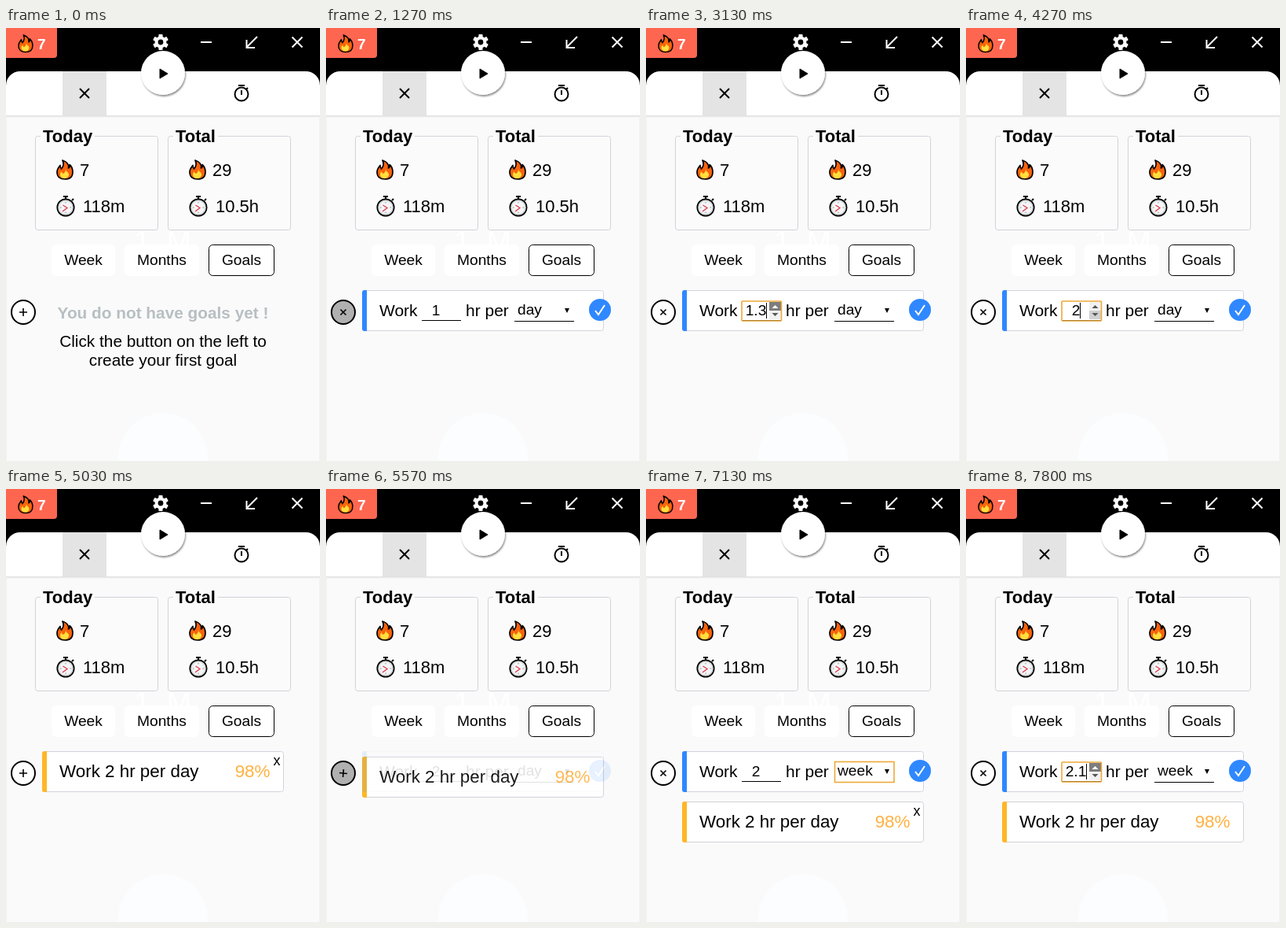
Write an HTML page that moves like this. It is 400 by 550 pixels and loops after 8 s.

```html
<!DOCTYPE html>
<html lang="en">
<head>
<meta charset="utf-8">
<title>Goals</title>
<style>
  html, body { margin: 0; width: 100%; height: 100%; overflow: hidden; background: #fafafa; }
  svg { display: block; width: 400px; height: 550px; font-family: "Liberation Sans", Arial, sans-serif; }
  .bold { font-weight: bold; }
  .t19 { font-size: 19.2px; }
  .t21 { font-size: 20.8px; }
  .t22 { font-size: 22px; }
  .mid { text-anchor: middle; }
  .line { fill: none; stroke: #000; stroke-width: 2; }
  .white { stroke: #fff; }
  .card { fill: #fbfbfb; stroke: #d2d2da; }
  .ring { fill: none; stroke: #eda93a; stroke-width: 1.6; }
</style>
</head>
<body>
<svg viewBox="0 0 400 550">
  <defs>
    <filter id="shadow" x="-30%" y="-30%" width="160%" height="160%">
      <feDropShadow dx="1" dy="2" stdDeviation="1.2" flood-opacity=".45"/>
    </filter>
    <linearGradient id="under" x2="0" y2="1">
      <stop stop-color="#dcdcdc"/><stop offset="1" stop-color="#fafafa"/>
    </linearGradient>
    <g id="flame">
      <path d="M8 1C14 3 16.500 7 15.500 11C17 10 17.500 8 17 6.500C20 9 21 12 21 16C21 22 17 25 11 25C5 25 1 22 1 16C1 12 3 10 5 7.500C5 10 5.500 11 6.500 12C9 9 10 5 8 1Z"
        fill="#f7630c" stroke="#000" stroke-width="1.7" stroke-linejoin="round"/>
      <path d="M12 12C12 16 17 16 16 20C15 23 13 24 11 24C7 24 5 22 5 19C5 17 6 16 7 15C7 17 8 18 9 18C11 17 12 15 12 12Z" fill="#ffdf3d"/>
    </g>
    <g id="watch">
      <path d="M0-11V-14M-3-14H3M8-9L10-11" class="line"/>
      <circle r="10.700" fill="#d5d8da" stroke="#000" stroke-width="1.700"/>
      <circle r="8" fill="#f5f6f7"/>
      <path d="M-3.500-3L2 .5L-4 5" fill="none" stroke="#e5374b" stroke-width="1.300"/>
      <path d="M0-7V-5.500M0 5.500V7M-7 0H-5.500M5.500 0H7" stroke="#888"/>
    </g>
  </defs>

  <rect width="400" height="550" fill="#fafafa"/>
  <rect width="400" height="90"/>
  <path d="M0 111V73A18 18 0 0 1 18 55H382A18 18 0 0 1 400 73V111Z" fill="#fff"/>
  <rect y="111" width="400" height="3" fill="url(#under)"/>
  <path d="M.5 112V550M399.500 112V550" stroke="#f1f1f1"/>

  <path d="M0 0H65V34A4 4 0 0 1 61 38H0Z" fill="#ff6650"/>
  <use href="#flame" transform="translate(15 8) scale(.9)"/>
  <text x="40" y="27" font-size="19.200" class="bold" fill="#fff">7</text>
  <g id="gear" transform="translate(197 18)" fill="#fff"></g>
  <path d="M248 18H262M320 11L307 24M306.500 15V25H317M364.500 11.500L377.500 24.500M377.500 11.500L364.500 24.500" class="line white"/>

  <rect x="72" y="55" width="56" height="56" fill="#e4e4e4"/>
  <path d="M94 77L106 89M106 77L94 89" class="line"/>
  <circle cx="300" cy="84" r="8.500" class="line"/>
  <path d="M296 73H304M300 79V85M306 78L308 76" class="line"/>
  <circle cx="200" cy="57" r="28" fill="#fff" filter="url(#shadow)"/>
  <path d="M196 52V64L206 58Z" stroke="#000" stroke-linejoin="round"/>

  <circle cx="200" cy="546" r="57" fill="#fbfdff"/>
  <text y="284" font-size="37" fill="#fff"><tspan x="163">1</tspan><tspan x="205">M</tspan></text>

  <g id="cards"></g>
  <g id="tabs" class="t19 mid"></g>

  <g id="empty">
    <text x="200" y="369" class="t21 bold mid" fill="#b7bfc2">You do not have goals yet !</text>
    <text x="200" y="405" class="t21 mid">Click the button on the left to</text>
    <text x="200" y="429" class="t21 mid">create your first goal</text>
  </g>

  <g id="item">
    <rect x="46.500" y="333.500" width="307" height="51" rx="3" fill="#fff" stroke="#d2d2da"/>
    <path d="M52 333H49A3 3 0 0 0 46 336V382A3 3 0 0 0 49 385H52Z" fill="#ffb727"/>
    <text x="68" y="366" font-size="22.400">Work 2 hr per day</text>
    <text x="336.500" y="366" font-size="22.400" text-anchor="end" fill="#ffb242">98%</text>
    <text id="close" x="340.500" y="351" font-size="18">x</text>
  </g>

  <g id="form">
    <rect x="46.500" y="333.500" width="307" height="51" rx="3" fill="#fff" stroke="#d2d2da"/>
    <path d="M52 333H49A3 3 0 0 0 46 336V382A3 3 0 0 0 49 385H52Z" fill="#2f88ff"/>
    <text x="68" y="366" font-size="21">Work</text>
    <text x="178" y="366" font-size="21">hr per</text>
    <path d="M122 371.500H172M240 372.500H316" stroke="#000"/>
    <text id="value" x="140" y="365" class="t19 mid"></text>
    <g id="spinner">
      <rect id="up" x="157" y="348" width="15" height="11"/>
      <rect id="down" x="157" y="359" width="15" height="11"/>
      <path id="upArrow" d="M160.500 356H168.500L164.500 352Z"/>
      <path d="M160.500 362H168.500L164.500 366Z" fill="#555"/>
    </g>
    <path id="caret" d="M0 349V369" stroke="#000"/>
    <rect id="inputRing" x="122" y="347" width="50.500" height="25" rx="1" class="ring"/>
    <text id="unit" x="244" y="364" class="t19"></text>
    <path d="M304 356H310L307 362Z"/>
    <rect id="unitRing" x="240.500" y="346.500" width="75.500" height="26" class="ring"/>
    <circle id="check" cx="349" cy="358" r="14" fill="#2f88ff"/>
    <path d="M343 359L347 364L355 352" class="line white" stroke-width="1.500"/>
  </g>

  <g id="list">
    <rect id="listBox" x="240" y="373" width="76" height="98"/>
    <g id="options" class="t19"></g>
  </g>

  <circle id="add" cx="22" cy="361" r="15" stroke="#000" stroke-width="2"/>
  <path id="plus" d="M17 361H27M22 356V366" stroke="#000" stroke-width="1.600"/>
</svg>

<script>
const LOOP = 8000;
const UNITS = ["day", "week", "month", "year"];
const $ = id => document.getElementById(id);
const set = (id, name, value) => $(id).setAttribute(name, value);
const show = (id, on) => set(id, "visibility", on ? "visible" : "hidden");

const card = (x, title, gap, count, time) => `
  <rect x="${x + .5}" y="137.5" width="156" height="119" rx="3" class="card"/>
  <rect x="${x + 7}" y="130" width="${gap}" height="14" fill="#fbfbfb"/>
  <text x="${x + 10}" y="145" class="t22 bold">${title}</text>
  <use href="#flame" x="${x + 27}" y="167"/>
  <text x="${x + 57}" y="188" class="t22">${count}</text>
  <use href="#watch" x="${x + 39}" y="228"/>
  <text x="${x + 61}" y="234" class="t22">${time}</text>`;
$("cards").innerHTML = card(37, "Today", 69, 7, "118m") + card(206, "Total", 57, 29, "10.5h");

const tab = (x, w, label, active) => `
  <rect x="${x + .5}" y="275.5" width="${w - 1}" height="39" rx="5" fill="#fff" stroke="${active ? "#000" : "#fff"}"/>
  <text x="${x + w / 2}" y="301">${label}</text>`;
$("tabs").innerHTML = tab(58, 81, "Week") + tab(151, 95, "Months") + tab(258, 84, "Goals", true);

const tooth = a => `<rect x="-2.6" y="-10" width="5.2" height="6" rx="1" transform="rotate(${a})"/>`;
$("gear").innerHTML = [0, 60, 120, 180, 240, 300].map(tooth).join("") +
  '<circle r="5.4" fill="none" stroke="#fff" stroke-width="4"/>';

$("options").innerHTML = UNITS.map((u, i) =>
  `<rect x="241" y="${374 + i * 24}" width="74" height="24"/><text x="245" y="${392 + i * 24}">${u}</text>`).join("");
const rows = $("options").querySelectorAll("rect");
const labels = $("options").querySelectorAll("text");

// Held values: [start ms, value]
const VALUE = [[0, "1"], [2870, "1.1"], [3000, "1.2"], [3130, "1.3"], [3230, "1.4"], [3270, "1.5"],
  [3530, "1.6"], [3620, "1.7"], [3670, "1.8"], [3770, "1.9"], [3970, "2"], [7670, "2.1"]];
const SPIN = [[0, ""], [1600, "idle"], [2270, "down"], [2500, "up"], [2870, "press"], [2930, "up"],
  [3000, "press"], [3070, "up"], [3130, "press"], [3270, "up"], [3530, "press"], [3580, "up"],
  [3620, "press"], [3720, "up"], [3770, "press"], [3800, "up"], [3970, "press"], [4030, "up"],
  [4270, "down"], [4300, ""], [7300, "idle"], [7370, "up"], [7670, "press"]];
const INPUT_FOCUS = [[0, 0], [2870, 1], [4670, 0], [7670, 1]];
const UNIT_FOCUS = [[0, 0], [6330, 1], [7670, 0]];
const LIST = [[0, ""], [6330, "black"], [6370, "day"], [6570, "month"], [6670, "week"], [7130, ""]];
const UNIT = [[0, "day"], [7130, "week"]];
const CLOSE = [[0, 0], [4830, 1], [5270, 0], [7130, 1], [7270, 0]];

// Eased values: [ms, value]
const EMPTY = [[1000, 1], [1200, 0]];
const FORM = [[1000, 0], [1270, 1], [4830, 1], [5030, 0], [5530, 0], [5730, 1]];
const ITEM = [[4830, 0], [5030, 1]];
const ITEM_Y = [[5530, 0], [5730, 64]];
const TURN = [[1070, 0], [1270, 45], [4830, 45], [5030, 0], [5530, 0], [5730, 45]];
const HOVER = [[1000, 0], [1150, 1], [1470, 1], [1620, 0], [5270, 0], [5420, 1], [5730, 1], [5870, 0]];
const CHECK = [[4340, 0], [4540, 1], [4830, 1], [5030, 0]];

const held = (table, t) => table.filter(s => s[0] <= t).pop()[1];
function eased(table, t) {
  const i = table.findIndex(s => s[0] > t);
  if (i < 0) return table[table.length - 1][1];
  if (i === 0) return table[0][1];
  const [a, from] = table[i - 1], [b, to] = table[i];
  const p = (t - a) / (b - a);
  return from + (to - from) * p * p * (3 - 2 * p);
}

function draw(t) {
  const value = held(VALUE, t), spin = held(SPIN, t), list = held(LIST, t);
  const focus = held(INPUT_FOCUS, t);

  set("empty", "opacity", eased(EMPTY, t));
  set("form", "opacity", eased(FORM, t));
  set("item", "opacity", eased(ITEM, t));
  set("item", "transform", `translate(0 ${eased(ITEM_Y, t)})`);
  show("close", held(CLOSE, t));

  $("value").textContent = value;
  show("inputRing", focus);
  show("caret", focus);
  set("caret", "transform", `translate(${value.length > 1 ? 153.5 : 145.5} 0)`);
  show("spinner", spin);
  set("up", "fill", { press: "#7d7d7d", up: "#d0d0d0" }[spin] || "#f1f1f1");
  set("upArrow", "fill", spin === "press" ? "#fff" : "#555");
  set("down", "fill", spin === "down" ? "#d0d0d0" : "#f1f1f1");

  $("unit").textContent = held(UNIT, t);
  show("unitRing", held(UNIT_FOCUS, t));
  show("list", list);
  show("options", list && list !== "black");
  set("listBox", "fill", list === "black" ? "#000" : "#888");
  rows.forEach((r, i) => r.setAttribute("fill", UNITS[i] === list ? "#1e90ff" : "#fff"));
  labels.forEach((l, i) => l.setAttribute("fill", UNITS[i] === list ? "#fff" : "#000"));

  const grey = 255 - 79 * eased(HOVER, t);
  set("add", "fill", `rgb(${grey},${grey},${grey})`);
  set("plus", "transform", `rotate(${eased(TURN, t)} 22 361)`);
  set("check", "fill-opacity", 1 - .2 * eased(CHECK, t));
}

function tick() {
  draw(performance.now() % LOOP);
  requestAnimationFrame(tick);
}
tick();
</script>
</body>
</html>
```
